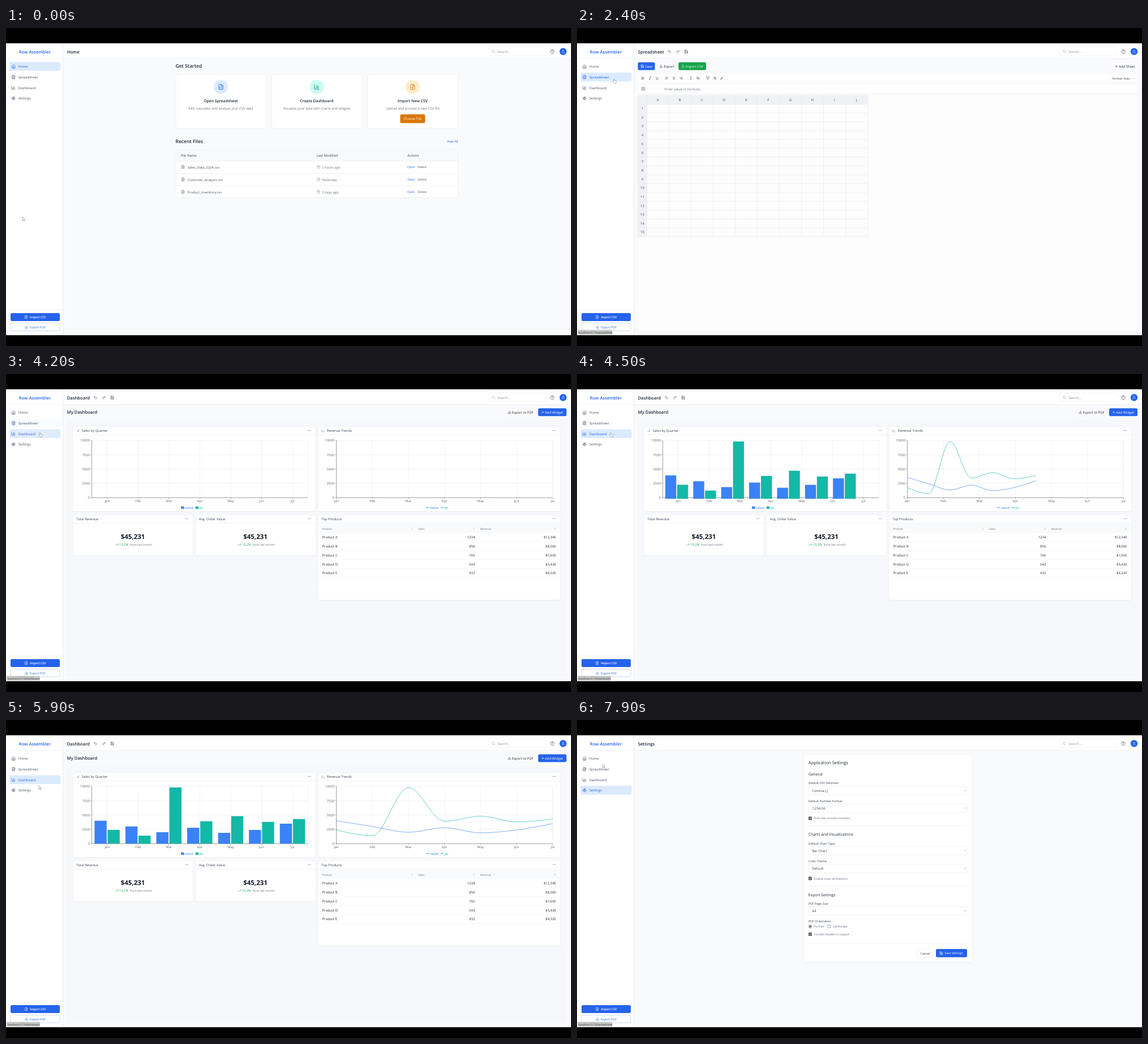
Write an HTML page that moves like this. It is 998 by 561 pixels and loops after 8000 ms.

```html
<!DOCTYPE html>
<html lang="en">
<head>
<meta charset="utf-8">
<title>Row Assembler</title>
<style>
html, body { margin: 0; width: 100%; height: 100%; overflow: hidden; background: #000; }
svg { display: block; width: 998px; height: 561px; }
text { font-family: "Open Sans", "Noto Sans", sans-serif; text-rendering: geometricPrecision; white-space: pre; }
</style>
</head>
<body>
<svg id="stage" viewBox="0 0 998 561"></svg>
<script>
const BLUE = '#2563eb', DARK = '#1f2937', MID = '#4b5563', SOFT = '#6b7280', LINE = '#e5e7eb',
  BAR = '#3b82f6', TEAL = '#14b8a6', GREEN = '#16a34a', AMBER = '#d97706';
const UNIT = 0.4456;  // stage pixels per CSS pixel of the app
const FILE = 'M14 2H6a2 2 0 0 0-2 2v16a2 2 0 0 0 2 2h12a2 2 0 0 0 2-2V8zM14 2v6h6';
const TRAY = 'M21 15v4a2 2 0 0 1-2 2H5a2 2 0 0 1-2-2v-4';
const ICONS = {
  home: 'M3 9l9-7 9 7v11a2 2 0 0 1-2 2H5a2 2 0 0 1-2-2zM9 22V12h6v10',
  doc: FILE + 'M16 13H8M16 17H8M10 9H8',
  sheet: FILE + 'M8 13h2M8 17h2M14 13h2M14 17h2',
  plusDoc: FILE + 'M12 18v-6M9 15h6',
  bars: 'M3 3v18h18M18 17V9M13 17V5M8 17v-3',
  columns: 'M18 20V4M12 20V10M6 20v-4',
  trend: 'M3 3v18h18M19 9l-5 5-4-4-3 3',
  rise: 'M22 7l-8.5 8.5-5-5L2 17M16 7h6v6',
  gear: 'M12 5a7 7 0 1 0 .01 0M12 9a3 3 0 1 0 .01 0M12 2v3M12 19v3M2 12h3M19 12h3M5 5l2 2M17 17l2 2M5 19l2-2M17 7l2-2',
  down: TRAY + 'M7 10l5 5 5-5M12 15V3',
  up: TRAY + 'M17 8l-5-5-5 5M12 3v12',
  search: 'M11 3a8 8 0 1 0 .01 0M21 21l-4.3-4.3',
  help: 'M12 2a10 10 0 1 0 .01 0M9 9a3 3 0 0 1 6 1c0 2-3 3-3 3M12 17v.1',
  user: 'M19 21v-2a4 4 0 0 0-4-4H9a4 4 0 0 0-4 4v2M12 3a4 4 0 1 0 .01 0',
  clock: 'M12 2a10 10 0 1 0 .01 0M12 6v6l4 2',
  undo: 'M9 14L4 9l5-5M4 9h10a5 5 0 0 1 0 11h-3',
  redo: 'M15 14l5-5-5-5M20 9H10a5 5 0 0 0 0 11h3',
  save: 'M19 21H5a2 2 0 0 1-2-2V5a2 2 0 0 1 2-2h11l5 5v11a2 2 0 0 1-2 2zM17 21v-8H7v8M7 3v5h8',
  plus: 'M12 5v14M5 12h14',
  bold: 'M6 4h8a4 4 0 0 1 0 8H6zM6 12h9a4 4 0 0 1 0 8H6z',
  italic: 'M19 4h-9M14 20H5M15 4L9 20',
  under: 'M6 4v6a6 6 0 0 0 12 0V4M4 20h16',
  left: 'M21 6H3M15 12H3M17 18H3',
  center: 'M21 6H3M17 12H7M19 18H5',
  right: 'M21 6H3M21 12H9M21 18H7',
  type: 'M7 3h4l1 1 1-1h4M12 4v16M7 21h4l1-1 1 1h4',
  paint: 'M19 11l-8-8-8 8 7 8zM5 2l5 5M3 12h16M21 16v4',
  filter: 'M22 3H2l8 9.5V19l4 2v-8.5z',
  sort: 'M3 5l5-2v9M4 14l16 6M12 8h8M12 13h8',
  brush: 'M9 12l9-9 3 3-9 9zM9 12c-4 0-5 5-7 8 5 1 10-1 10-5',
  formula: 'M3 3h18v18H3zM9 17c4 0 2-10 6-10M9 11h5',
  chevron: 'M5 9l7 7 7-7',
  upDown: 'M7 15l5 5 5-5M7 9l5-5 5 5'
};

const text = (x, y, s, size = 14, fill = MID, weight = 400, anchor = 'start') => {
  const px = size * UNIT * 0.955;
  return `<text x="${x}" y="${y + px * 0.355}" font-size="${px}" fill="${fill}" font-weight="${weight}" text-anchor="${anchor}">${s}</text>`;
};
const box = (x, y, r, b, fill, radius = 0, stroke = 'none') =>
  `<rect x="${x}" y="${y}" width="${r - x}" height="${b - y}" rx="${radius}" fill="${fill}" stroke="${stroke}" stroke-width=".5"/>`;
const dot = (x, y, r, fill) => `<circle cx="${x}" cy="${y}" r="${r}" fill="${fill}"/>`;
const path = (d, stroke, width = 0.5, more = '') =>
  `<path d="${d}" fill="none" stroke="${stroke}" stroke-width="${width}" ${more}/>`;
const icon = (x, y, name, color = MID, size = 16) => {
  const k = size * UNIT / 24;
  return `<g transform="translate(${x - 12 * k} ${y - 12 * k}) scale(${k})" stroke-linecap="round" stroke-linejoin="round">${path(ICONS[name], color, 2)}</g>`;
};
const card = (x, y, r, b) => box(x, y + .6, r, b + .8, '#eceef2', 3.5) + box(x, y, r, b, '#fff', 3.5, LINE);
const rule = (x, y, r, color = LINE) => path(`M${x} ${y}H${r}`, color);
const range = n => [...Array(n).keys()];

const NAV = [['Home', 'home'], ['Spreadsheet', 'doc'], ['Dashboard', 'bars'], ['Settings', 'gear']];
const MONTHS = ['Jan', 'Feb', 'Mar', 'Apr', 'May', 'Jun', 'Jul'];
const VALUE = [4000, 3000, 2000, 2780, 1890, 2390, 3490];
const PV = [2400, 1398, 9800, 3908, 4800, 3800, 4300];

function frame() {
  return box(0, 27, 998, 542, '#f9fafc') + box(0, 27, 100.5, 542, '#fff') + box(100.5, 27, 998, 53.5, '#fff') +
    rule(0, 53.6, 998) + path('M100.7 27V542', LINE, .7) + rule(0, 497, 100) +
    text(51, 41.8, 'Row Assembler', 18, BLUE, 600, 'middle') +
    box(853, 33.5, 953, 49, '#fff', 3, LINE) + icon(861, 41.5, 'search', '#9ca3af') +
    text(868, 41.7, 'Search...', 14, '#8b93a0') + icon(965, 41.5, 'help', MID, 18) +
    dot(984, 41.5, 6.2, BLUE) + icon(984, 41.5, 'user', '#fff', 14) +
    box(8, 503, 95, 517, BLUE, 2.5) + icon(35.5, 510, 'plusDoc', '#fff', 14) +
    text(56.3, 510.2, 'Import CSV', 12.3, '#fff', 600, 'middle') +
    box(8, 520.5, 95, 534.2, '#fff', 2.5, '#93b4ee') + icon(36, 527.5, 'down', BLUE, 14) +
    text(56, 527.6, 'Export PDF', 12.7, BLUE, 400, 'middle');
}

function header(title, toolsX) {
  const tools = toolsX ? ['undo', 'redo', 'save'].map((n, i) => icon(toolsX + i * 14.8, 41.5, n)).join('') : '';
  return text(107.7, 41.8, title, 18, DARK, 600) + tools;
}

function home() {
  const starts = [
    [300, 'Open Spreadsheet', 'Edit, calculate, and analyze your CSV data', 'sheet', '#dbeafe', BLUE],
    [469.4, 'Create Dashboard', 'Visualize your data with charts and widgets', 'bars', '#ccfbf1', '#0d9488'],
    [638.8, 'Import New CSV', 'Upload and process a new CSV file', 'plusDoc', '#fbeecb', AMBER]];
  const files = [['Sales_Data_2024.csv', '2 hours ago'], ['Customer_Analysis.csv', 'Yesterday'], ['Product_Inventory.csv', '3 days ago']];
  return header('Home') + text(299.5, 67, 'Get Started', 20, DARK, 600) +
    starts.map(([x, title, note, name, tint, color]) => {
      const c = x + 79.5;
      return card(x, 82.3, x + 159.3, 177.3) + dot(c, 104, 12.5, tint) + icon(c, 104, name, color, 24) +
        text(c, 128.5, title, 16, DARK, 600, 'middle') + text(c, 142, note, 14, SOFT, 400, 'middle');
    }).join('') +
    box(696.3, 152.2, 740.3, 167.8, AMBER, 2.5) + text(718.2, 160.2, 'Choose File', 14, '#fff', 400, 'middle') +
    text(299.5, 200, 'Recent Files', 20, DARK, 600) + text(798.5, 199.7, 'View All', 13, BLUE, 400, 'end') +
    card(300, 215, 798.5, 299.5) + box(300.3, 215.3, 798.2, 234.8, '#f8f9fa', 3) +
    text(309, 225, 'File Name', 14, '#374151', 500) + text(548.7, 225, 'Last Modified', 14, '#374151', 500) +
    text(709, 225, 'Actions', 14, '#374151', 500) +
    files.map(([name, when], i) => {
      const y = 245.5 + i * 22;
      return rule(300, y - 10.9, 798.5) + icon(312.5, y - .3, 'doc', SOFT) + text(320.5, y, name) +
        icon(552, y - .3, 'clock', SOFT, 14) + text(558, y, when, 14, SOFT) +
        text(709, y, 'Open', 12.2, BLUE, 500) + text(727, y, 'Delete', 12.2, MID);
    }).join('');
}

function spreadsheet() {
  const tools = { bold: 116.3, italic: 129, under: 141.5, left: 158.5, center: 171.2, right: 184, type: 201, paint: 213.7, filter: 231, sort: 243.6, brush: 256 };
  const colX = i => 123.5 + i * 39, rowY = i => 134.3 + i * 15.57;
  return header('Spreadsheet', 163.3) +
    box(107.5, 60.5, 137.5, 74.3, BLUE, 2.5) + icon(115.5, 67.5, 'save', '#fff', 14) + text(120.2, 67.7, 'Save', 14, '#fff') +
    box(141.7, 60.5, 175.3, 74.3, '#fcfcfd', 2.5, '#f0f1f4') + icon(148.5, 67.5, 'down', DARK, 14) + text(153.7, 67.7, 'Export', 14, DARK) +
    box(179.3, 60.5, 228, 74.3, GREEN, 2.5) + icon(187, 67.3, 'up', '#fff', 14) + text(191.7, 67.5, 'Import CSV', 14, '#fff') +
    box(944, 60.5, 990, 74.3, '#fcfcfd', 2.5, '#f0f1f4') + icon(952.8, 67.5, 'plus', DARK, 14) + text(957, 67.7, 'Add Sheet', 14, DARK) +
    box(107.5, 80.8, 990, 96.2, '#fff', 2, '#f0f1f4') +
    Object.entries(tools).map(([n, x]) => icon(x, 88.6, n, '#374151', 14)).join('') +
    box(942, 82.8, 988, 94.5, '#fff', 2, '#f0f1f4') + text(945.7, 89, 'Format: Auto', 12, DARK) + icon(983.5, 88.8, 'chevron', DARK, 9) +
    box(107.5, 99.8, 990, 115.2, '#fff', 2, '#f0f1f4') + icon(117.2, 107.3, 'formula', '#374151', 15) +
    text(154.5, 107.7, 'Enter value or formula...', 14, SOFT) +
    box(107.5, 118.3, 990, 534, '#fdfdfe', 2, '#f0f1f4') +
    box(107.5, 118.5, 513.5, 134.3, '#eff1f4') + box(107.5, 134.3, 123.5, rowY(15), '#eff1f4') +
    range(11).map(i => path(`M${colX(i)} 118.5V${rowY(15)}`, '#e2e4e8')).join('') +
    range(16).map(i => rule(107.5, rowY(i), 513.5, '#e2e4e8')).join('') +
    [...'ABCDEFGHIJ'].map((s, i) => text(colX(i) + 19.3, 126.8, s, 14, '#374151', 500, 'middle')).join('') +
    range(15).map(i => text(115.5, rowY(i) + 7.9, i + 1, 14, '#374151', 500, 'middle')).join('');
}

function widget(x, y, r, b, title, name) {
  return card(x, y, r, b) + rule(x, y + 15, r) +
    (name ? icon(x + 9, y + 7.3, name, SOFT, 13) : '') + text(x + (name ? 15.8 : 6.3), y + 7.5, title, 14, '#374151', 500) +
    range(3).map(i => dot(r - 13.2 + i * 2, y + 7, .6, MID)).join('');
}

function axes(x, ticks) {
  const dash = 'stroke-dasharray="1.4 1.4"';
  return range(5).map(i => {
    const y = 117 + i * 25.3;
    return path(`M${x} ${y}H${x + 382}`, '#ccc', .45, dash) + path(`M${x - 2.5} ${y}H${x}`, '#666') +
      text(x - 3.5, y + .1, 10000 - i * 2500, 14, '#666', 400, 'end');
  }).join('') +
    ticks.map((tx, i) => path(`M${tx} 117V218.2`, '#ccc', .45, dash) + path(`M${tx} 218.2v2.5`, '#666') +
      text(tx, 224.2, MONTHS[i], 14, '#666', 400, 'middle')).join('') +
    path(`M${x} 117V218.2H${x + 382}`, '#666', .6) + path(`M${x + 382} 117V218.2`, '#ccc', .45, dash);
}

function kpi(x, title) {
  return widget(x, 248, x + 212.5, 320.5, title) + text(x + 106, 287, '$45,231', 27, '#111827', 700, 'middle') +
    icon(x + 77.5, 301.2, 'rise', GREEN, 14) + text(x + 82, 301.2, '13.2%', 13.6, GREEN, 500) +
    text(x + 101, 301.2, 'from last month', 12.2, SOFT);
}

function dashboard() {
  const products = [['A', '1234', '$12,340'], ['B', '856', '$8,560'], ['C', '765', '$7,650'], ['D', '543', '$5,430'], ['E', '432', '$4,320']];
  const key = (x, color) => path(`M${x - 2.7} 235.6h5.4`, color, .7) + `<circle cx="${x}" cy="235.6" r="1" fill="#fff" stroke="${color}" stroke-width=".6"/>`;
  return header('Dashboard', 158) + text(107.7, 67.7, 'My Dashboard', 18, DARK, 600) +
    box(881.5, 60.5, 936, 74.3, '#fcfcfd', 2.5, '#f0f1f4') + icon(889.2, 67.5, 'down', DARK, 14) + text(893.7, 67.7, 'Export to PDF', 14, DARK) +
    box(940, 60.5, 990, 74.3, BLUE, 2.5) + icon(948, 67.5, 'plus', '#fff', 14) + text(952, 67.7, 'Add Widget', 14, '#fff') +
    box(107.5, 81, 990, 534, '#f7f8fb', 3) +
    widget(118, 92.5, 547, 242.5, 'Sales by Quarter', 'columns') + widget(551, 92.5, 979.5, 242.5, 'Revenue Trends', 'trend') +
    axes(151.5, range(7).map(i => 178.8 + i * 54.55)) + axes(583.5, range(7).map(i => 583.5 + i * 63.67)) +
    box(309, 233.6, 314.5, 237.9, BAR) + text(315.7, 235.7, 'value', 14.5, BAR) +
    box(334.7, 233.6, 340.2, 237.9, TEAL) + text(341.5, 235.7, 'pv', 14.5, TEAL) +
    key(744.5, BAR) + text(748.7, 235.7, 'value', 14.5, BAR) + key(770.3, TEAL) + text(774.3, 235.7, 'pv', 14.5, TEAL) +
    '<g id="plot"></g>' + kpi(118, 'Total Revenue') + kpi(334.5, 'Avg. Order Value') +
    widget(551, 248, 979.5, 399, 'Top Products') + box(551.3, 263.3, 979.2, 280.5, '#f9fafb') +
    [['Product', 558.7, 716.5], ['Sales', 728, 826.5], ['Revenue', 837.7, 969.5]].map(([s, x, end]) =>
      text(x, 273.2, s, 11, SOFT, 500) + icon(end, 273, 'upDown', '#9ca3af', 12)).join('') +
    products.map(([id, sold, sum], i) => {
      const y = 287.9 + i * 15.85;
      return rule(551, y + 7.9, 979.5, '#f0f1f4') + text(558.5, y, 'Product ' + id, 14, DARK) +
        text(828.3, y, sold, 14, DARK, 400, 'end') + text(971.5, y, sum, 14, DARK, 400, 'end');
    }).join('');
}

function settings() {
  const section = (y, s) => text(408.8, y, s, 16, DARK, 500);
  const label = (y, s) => text(408.8, y, s, 12.6, '#374151', 500);
  const select = (y, name, s) => label(y - 13, name) + box(408.7, y - 7.6, 689, y + 7.5, '#fff', 2.5, '#dfe2e7') +
    text(415.2, y + .1, s, 14, '#374151') + icon(685.5, y - .2, 'chevron', DARK, 9);
  const check = (y, s) => box(408.9, y - 3, 414.9, y + 3, '#565b62', 1) +
    path(`M410.3 ${y}l1.2 1.3 2.2-2.7`, '#fff', .8) + text(418.2, y + .2, s, 12.5, SOFT);
  const radio = (x, s, on) => `<circle cx="${x}" cy="364.2" r="2.7" fill="#fff" stroke="#565b62" stroke-width=".6"/>` +
    (on ? dot(x, 364.2, 1.6, '#565b62') : '') + text(x + 6, 364.5, s, 12.5, SOFT);
  return header('Settings') + card(400, 60.5, 698, 427.5) + text(408.8, 75.6, 'Application Settings', 18, DARK, 500) +
    section(96, 'General') + select(124.5, 'Default CSV Delimiter', 'Comma (,)') + select(155.6, 'Default Number Format', '1,234.56') +
    check(173.4, 'First row contains headers') + rule(409, 186.5, 689) +
    section(202, 'Charts and Visualizations') + select(230.6, 'Default Chart Type', 'Bar Chart') + select(261.9, 'Color Theme', 'Default') +
    check(279.6, 'Enable chart animations') + rule(409, 292.6, 689) +
    section(308.3, 'Export Settings') + select(336.9, 'PDF Page Size', 'A4') + label(355, 'PDF Orientation') +
    radio(411.9, 'Portrait', true) + radio(445.4, 'Landscape') + check(378, 'Include headers in export') + rule(409, 394.3, 689) +
    box(600, 404, 629.5, 418.6, '#fff', 2.5, LINE) + text(614.8, 411.6, 'Cancel', 12.6, '#374151', 400, 'middle') +
    box(634, 404, 689, 418.6, BLUE, 2.5) + icon(643.5, 411.3, 'save', '#fff', 14) + text(649.3, 411.6, 'Save Settings', 12.3, '#fff', 500);
}

const stage = document.getElementById('stage');
stage.innerHTML = frame() + '<g id="nav"></g>' +
  [home, spreadsheet, dashboard, settings].map((page, i) => `<g id="page${i}">${page()}</g>`).join('') +
  '<g id="status"></g><g id="cursor"></g>';
const part = id => document.getElementById(id);
const set = (id, markup) => { part(id).innerHTML = markup; };

const clamp = v => Math.max(0, Math.min(1, v));
const mix = (a, b, p) => a + (b - a) * p;
const blend = (a, b, p) => `rgb(${a.map((v, i) => Math.round(mix(v, b[i], p)))})`;

// cubic-bezier(.25, .1, .25, 1)
function ease(x) {
  if (x <= 0 || x >= 1) return clamp(x);
  const curve = (a, b, u) => 3 * a * u * (1 - u) ** 2 + 3 * b * u * u * (1 - u) + u ** 3;
  let low = 0, high = 1;
  for (let i = 0; i < 20; i++) {
    const u = (low + high) / 2;
    if (curve(.25, .25, u) < x) low = u; else high = u;
  }
  return curve(.1, 1, low);
}

function monotone(x0, step, ys) {
  const n = ys.length, s = range(n - 1).map(i => (ys[i + 1] - ys[i]) / step);
  const m = ys.map((_, i) => i && i < n - 1
    ? (Math.sign(s[i - 1]) + Math.sign(s[i])) * Math.min(Math.abs(s[i - 1]), Math.abs(s[i]), Math.abs(s[i - 1] + s[i]) / 4) : 0);
  m[0] = (3 * s[0] - m[1]) / 2;
  m[n - 1] = (3 * s[n - 2] - m[n - 2]) / 2;
  const h = step / 3;
  return `M${x0} ${ys[0]}` + s.map((_, i) => {
    const x = x0 + i * step;
    return `C${x + h} ${ys[i] + h * m[i]} ${x + 2 * h} ${ys[i + 1] - h * m[i + 1]} ${x + step} ${ys[i + 1]}`;
  }).join('');
}

// Charts relax from a narrower, taller layout into their final size.
function plot(t) {
  const since = t - 4300;
  if (since < 0) return '';
  const layout = p => ({ k: mix(.52, 1, p), base: mix(228, 218.2, p) });
  const a = layout(ease(since / 400)), b = layout(ease(since / 1500));
  const yOf = (v, base) => base - v / 10000 * (base - 117);
  const bars = (data, offset, color) => data.map((v, i) => {
    const x = 151.5 + (offset + i * 54.55) * a.k;
    return box(x, yOf(v, a.base), x + 21.4 * a.k, a.base, color);
  }).join('');
  const line = (data, color) => path(monotone(583.5, 63.67 * b.k, data.map(v => yOf(v, b.base))), color, .65);
  return bars(VALUE, 4.9, BAR) + bars(PV, 28, TEAL) + line(VALUE, BAR) + line(PV, TEAL);
}

// Pointer tip: time, x, y
const TRACK = [[0, 29, 333], [500, 36, 310], [1000, 75, 230], [1500, 83, 106], [1700, 83, 104.3], [1900, 78, 99], [2200, 64.5, 89.5],
  [3600, 64.5, 89.5], [3900, 59, 102.8], [5600, 59, 102.8], [6000, 57.5, 120.3], [7300, 57.5, 120.3], [7700, 47, 86], [7900, 45, 77.2]];
function pointer(t) {
  const i = Math.max(1, TRACK.findIndex(p => p[0] >= t));
  const [t0, x0, y0] = TRACK[i - 1], [t1, x1, y1] = TRACK[i];
  const p = clamp((t - t0) / (t1 - t0));
  return [mix(x0, x1, p), mix(y0, y1, p)];
}

const CLICKS = [-1000, 2225, 4125, 6125];
const STATUS = [[0, ''], [2100, 'spreadsheet', 62], [3900, 'dashboard', 59.5], [6000, 'settings', 53.8], [7500, 'dashboard', 59.5], [7700, 'spreadsheet', 62]];
const HAND = 'M0 1.2q0-1 .8-1t.8 1v2.2l2.4.5q1 .3.9 1.3l-.4 2.8h-3.6l-2-2.6q-.3-.9.6-.8l.5.5z';
const ARROW = 'M0 0v6.4l1.5-1.3 1.1 2.5 1.1-.5-1.1-2.4h2z';

function draw(t) {
  const page = CLICKS.filter(c => t >= c).length - 1;
  const fade = ease((t - CLICKS[page]) / 150);
  range(4).forEach(i => part('page' + i).setAttribute('visibility', i === page ? 'visible' : 'hidden'));

  const [x, y] = pointer(t);
  const over = NAV.findIndex((_, i) => x < 96 && y >= 60.2 + i * 18.7 && y <= 75.6 + i * 18.7);
  set('nav', NAV.map(([name, glyph], i) => {
    const top = 60 + i * 18.7, mid = top + 8;
    const on = i === page ? fade : i === page - 1 ? 1 - fade : 0;
    const rest = i === over ? [243, 244, 246] : [255, 255, 255];
    const color = blend([75, 85, 99], [37, 99, 235], on);
    return box(6.3, top, 96.3, top + 15.6, blend(rest, [219, 234, 254], on), 2.7) +
      icon(13.2, mid - .1, glyph, color, 17) + text(21.8, mid + .2, name, 14, color);
  }).join(''));

  if (page === 2) set('plot', plot(t));

  const [, link, end] = STATUS.filter(s => t >= s[0]).pop();
  set('status', link ? box(1, 532.6, end, 541.2, '#c6c8c5', .8) + text(2.8, 537, 'localhost:5173/' + link, 11, '#33363a') : '');
  set('cursor', `<path transform="translate(${x} ${y})" d="${over < 0 ? ARROW : HAND}" fill="#fff" stroke="#6f747c" stroke-width=".55" stroke-linejoin="round"/>`);
}

let start, shown;
function tick(now) {
  start ??= now;
  const t = Math.floor((now - start) % 8000 / 100) * 100;
  if (t !== shown) draw(shown = t);
  requestAnimationFrame(tick);
}
draw(0);
requestAnimationFrame(tick);
</script>
</body>
</html>
```
